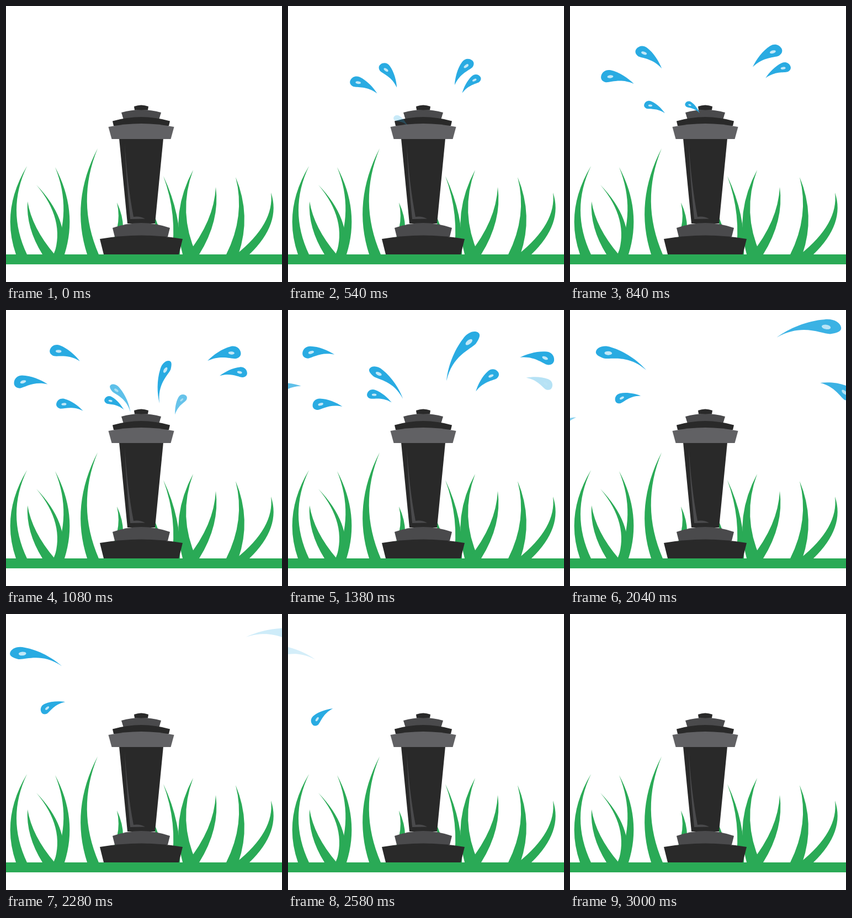
An HTML page with a canvas for the animation above (3360 ms loop, 500x500 px).

```html
<!DOCTYPE html>
<html lang="en">
<head>
<meta charset="utf-8">
<title>Lawn sprinkler</title>
<style>
html, body { margin: 0; width: 100%; height: 100%; overflow: hidden; background: #fff; }
canvas { display: block; width: 500px; height: 500px; }
</style>
</head>
<body>
<canvas id="stage" width="500" height="500"></canvas>
<script>
const ctx = document.getElementById('stage').getContext('2d');
const LOOP = 3360, STEP = 60, AXIS = 245;
const GREEN = '#2aaa56', DARK = '#292929', GREY = '#4a4a4c', LIGHT = '#616164';
const WATER = '#29abe2', SHINE = '#c3e8f7';
const FADE_IN = 240, FADE_OUT = 350, GROW = 700, LAG = 120;

const clamp = v => Math.min(1, Math.max(0, v));

// A blade: two edges from the tip to the ground, both bent towards x = bend.
function blade(tipX, tipY, base, width, bend) {
  const midY = (tipY + 450) / 2;
  ctx.beginPath();
  ctx.moveTo(tipX, tipY);
  ctx.quadraticCurveTo(bend, midY, base, 450);
  ctx.lineTo(base + width, 450);
  ctx.quadraticCurveTo(bend + .5 * width, midY, tipX, tipY);
  ctx.fill();
}

// A ring of the sprinkler: domed top, straight sides, centred on its axis.
function ring(color, top, topHalf, bottom, bottomHalf, dome) {
  ctx.fillStyle = color;
  ctx.beginPath();
  ctx.moveTo(AXIS - topHalf, top);
  ctx.quadraticCurveTo(AXIS, top - 2 * dome, AXIS + topHalf, top);
  ctx.lineTo(AXIS + bottomHalf, bottom);
  ctx.lineTo(AXIS - bottomHalf, bottom);
  ctx.fill();
}

function drawLawn() {
  ctx.fillStyle = GREEN;
  ctx.fillRect(0, 450, 500, 18);
  blade(38, 290, 18, 20, -10);
  blade(39, 354, 66, 22, 36);
  blade(55, 324, 87, 15, 108);
  blade(89, 292, 86, 20, 121);
  blade(166, 258, 147, 21, 116);
  blade(201, 356, 180, 22, 212);
  blade(267, 378, 255, 18, 278);
  blade(285, 308, 300, 15, 311);
  blade(339, 297, 320, 25, 298);
  blade(380, 328, 328, 22, 377);
  blade(416, 310, 399, 22, 434);
  blade(480, 338, 417, 24, 487);
}

function drawSprinkler() {
  ring(GREY, 193, 36, 206, 32, 5);
  ring(DARK, 182, 13, 188.5, 12, 2.5);
  ring(DARK, 208.5, 52, 217, 50, 7.5);
  ring(DARK, 240, 40, 394, 25, 0);
  ring(LIGHT, 219, 59.5, 241, 53.5, 6);
  ctx.fillStyle = GREY;
  ctx.fill(new Path2D('M215 248C217 300 221 345 225 386L252 385.5Q242 380 231 382C223 340 218 295 215 248Z'));
  ring(GREY, 402, 52, 418, 48, 9);
  ring(DARK, 422, 75, 450, 68, 6.5);
}

// Each drop flies along the parabola a-b-c, at a when t = from and at c when t = to.
const drops = [
  { born: 0, gone: 1640, from: 540, to: 1080, a: [137, 147], b: [91, 130], c: [45, 134], size: 61 },
  { born: 0, gone: 1790, from: 540, to: 1680, a: [182, 127], b: [114, 53], c: [-3, 94], size: 58 },
  { born: 0, gone: 1790, from: 540, to: 1680, a: [318, 121], b: [384, 53], c: [516, 111], size: 62 },
  { born: 0, gone: 1500, from: 540, to: 1080, a: [332, 143], b: [373, 113], c: [412, 117], size: 50 },
  { born: 480, gone: 2240, from: 540, to: 2040, a: [204, 209], b: [72, 138], c: [-11, 210], size: 54 },
  { born: 600, gone: 3000, from: 1080, to: 2580, a: [196, 171], b: [117, 134], c: [63, 186], size: 47 },
  { born: 900, gone: 2650, from: 1080, to: 2580, a: [207, 161], b: [141, 87], c: [1, 77], size: 97, slim: .62 },
  { born: 840, gone: 2360, from: 1080, to: 2040, a: [288, 131], b: [322, 45], c: [433, 42], size: 118, slim: .6 },
  { born: 910, gone: 2360, from: 1080, to: 2040, a: [316, 172], b: [382, 80], c: [482, 146], size: 64 }
];

function drawDrop({ born, gone, from, to, a, b, c, size, slim = 1 }, t) {
  const alpha = clamp((t - born) / FADE_IN) * clamp((gone - t) / FADE_OUT);
  if (!alpha) return;
  const u = (t - from) / (to - from), w = u - LAG / (to - from);
  const at = i => (1 - u) ** 2 * a[i] + 2 * u * (1 - u) * b[i] + u * u * c[i];
  const speed = i => (1 - w) * (b[i] - a[i]) + w * (c[i] - b[i]);
  const len = size * (.5 + .5 * clamp((t - born) / GROW));
  const side = c[0] < a[0] ? 1 : -1;
  ctx.save();
  ctx.globalAlpha = alpha;
  // unit space: tip at 0, nose at 1, bulge towards +y
  ctx.translate(at(0), at(1));
  ctx.rotate(Math.atan2(speed(1), speed(0)));
  ctx.scale(len, -len * side * -1);
  ctx.translate(-.5, 0);
  teardrop(slim);
  ctx.restore();
}

function teardrop(k) {
  const top = .07 + .18 * k, low = .06 - .19 * k;
  ctx.fillStyle = WATER;
  ctx.beginPath();
  ctx.moveTo(0, 0);
  ctx.bezierCurveTo(.2, .09 + .04 * k, .5, .11 + .14 * k, .76, top);
  ctx.bezierCurveTo(.9, top, 1, .03 + .12 * k, 1, .02);
  ctx.bezierCurveTo(1, .02 - .1 * k, .92, low, .82, low);
  ctx.bezierCurveTo(.68, low + .02, .42, .29 - .2 * k, 0, 0);
  ctx.fill();
  ctx.fillStyle = SHINE;
  ctx.beginPath();
  ctx.ellipse(.84 - .11 * k, .06, .04 + .05 * k, .022 + .022 * k, -.3, 0, 2 * Math.PI);
  ctx.fill();
}

function draw(t) {
  ctx.fillStyle = '#fff';
  ctx.fillRect(0, 0, 500, 500);
  drawLawn();
  drawSprinkler();
  for (const d of drops) drawDrop(d, t);
}

const start = performance.now();
function tick() {
  const t = (performance.now() - start) % LOOP;
  draw(Math.floor(t / STEP) * STEP);
  requestAnimationFrame(tick);
}
tick();
</script>
</body>
</html>
```
